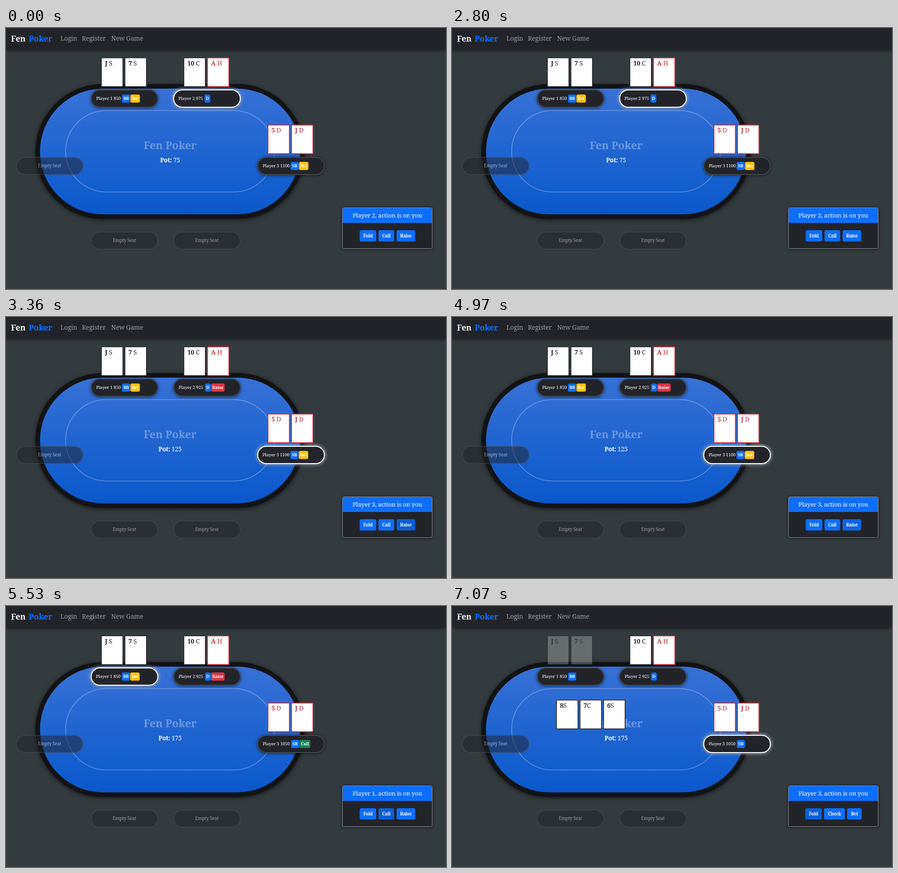
An HTML page that plays this animation: 971 by 577 pixels, repeating every 8000 ms.

```html
<!DOCTYPE html>
<html lang="en">
<head>
<meta charset="utf-8">
<title>Poker table</title>
<style>
html, body { margin: 0; width: 100%; height: 100%; overflow: hidden; background: #343b3e; }
svg { display: block; font: 500 9.8px "Noto Serif", "DejaVu Serif", serif; letter-spacing: -.02em; fill: #fff; }
.b { font-weight: 700; }
.m { text-anchor: middle; }
.nav { font-size: 14px; fill: #9b9c9f; }
.brand { font-size: 18px; font-weight: 600; }
.card { font-size: 14px; font-weight: 400; }
.pill { fill: #222429; stroke: #45494d; stroke-width: 2; }
.shade { filter: drop-shadow(0 1px 3px rgba(0, 0, 0, .6)); }
.glow { fill: #222429; stroke: #fff; stroke-width: 2; filter: drop-shadow(0 0 4px #dfeaff); }
</style>
</head>
<body>
<svg id="stage" width="971" height="577" viewBox="0 0 971 577">
  <defs>
    <linearGradient id="felt" x2="0" y2="1">
      <stop stop-color="#3871d6"/><stop offset="1" stop-color="#0a58cb"/>
    </linearGradient>
  </defs>
  <rect width="971" height="48" fill="#222429" style="filter: drop-shadow(0 2px 3px rgba(0,0,0,.5))"/>
  <text class="brand" x="11" y="30">Fen</text>
  <text class="brand b" x="50" y="30" fill="#0d6efd">Poker</text>
  <g class="nav">
    <text x="120" y="28">Login</text><text x="167.5" y="28">Register</text><text x="232" y="28">New Game</text>
  </g>
  <rect x="65" y="124" width="594" height="298" rx="149" fill="#111315" style="filter: drop-shadow(0 2px 5px rgba(0,0,0,.65))"/>
  <rect x="75" y="134" width="574" height="278" rx="139" fill="url(#felt)"/>
  <rect x="131.5" y="182.5" width="461" height="180" rx="90" fill="none" stroke="#fff" stroke-opacity=".3" stroke-width="1.7"/>
  <text class="m" x="362" y="268" font-size="23.5" font-weight="600" fill-opacity=".32">Fen Poker</text>
  <g id="empty"></g>
  <g id="live"></g>
</svg>
<script>
const LOOP = 8000, BLUE = '#0d6efd', INK = '#212529', RED = '#c5303c';
const $ = id => document.getElementById(id);

// Badge name -> [width, colour]
const BADGES = {
  D: [13, BLUE], BB: [18, BLUE], SB: [18, BLUE],
  Bet: [21, '#ffc107'], Raise: [30, '#dc3545'], Call: [24, '#198754']
};
const SEATS = [[187.5, 136.5], [369.5, 136.5], [555, 285.5]];
const EMPTY = [[22.5, 285.5], [187.5, 450.5], [369.5, 450.5]];
const ACTIONS = [['Fold', 780.5, 36.5], ['Call', 822, 34.5], ['Raise', 862, 41]];
const FLOP_ACTIONS = [['Fold', 779.5, 36.5], ['Check', 821, 46], ['Bet', 872, 32]];

// Each seat: chips, offset of the first badge, badges
const PHASES = [
  { at: 0, fade: 1, active: 1, pot: 75, seats: [[850, 68.5, 'BB', 'Bet'], [975, 69, 'D'], [1100, 73, 'SB', 'Bet']] },
  { at: 3080, fade: 290, active: 2, pot: 125, seats: [[850, 68.5, 'BB', 'Bet'], [925, 69.5, 'D', 'Raise'], [1100, 73, 'SB', 'Bet']] },
  { at: 5250, fade: 290, active: 0, pot: 175, seats: [[850, 68.5, 'BB', 'Bet'], [925, 69.5, 'D', 'Raise'], [1050, 74, 'SB', 'Call']] },
  { at: 6930, fade: 150, active: 2, pot: 175, flop: true, seats: [[850, 68.5, 'BB'], [925, 69.5, 'D'], [1050, 74, 'SB']] }
];

const ramp = (t, start, length) => {
  const k = Math.min(1, Math.max(0, (t - start) / length));
  return k * k * (3 - 2 * k);
};
const mix = (a, b, k) => a.map((v, i) => Math.round(v + (b[i] - v) * k));
const box = (x, y, w, h, r, attrs) => `<rect x="${x}" y="${y}" width="${w}" height="${h}" rx="${r}" ${attrs}/>`;
const text = (x, y, s, attrs = '') => `<text x="${x}" y="${y}" ${attrs}>${s}</text>`;
const pill = ([x, y], attrs) => box(x + .5, y + .5, 147, 38, 19, attrs);

function card(x, y, rank, suit, gap = ' ') {
  const red = 'HD'.includes(suit), color = red ? RED : INK;
  return box(x + 1, y + 1, 47.5, 63.5, 1, `fill="#fff" stroke="${color}" stroke-width="${red ? 2 : 1.7}"`) +
    text(x + 8.7, y + 17.5, `<tspan class="b">${rank}</tspan>${gap}${suit}`, `class="card" fill="${color}"`);
}

function seat(i, [chips, offset, ...badges], glow) {
  const [x, y] = SEATS[i], left = x - glow / 2;
  let out = pill(SEATS[i], 'class="pill shade"');
  if (glow) out += pill(SEATS[i], `class="glow" opacity="${glow.toFixed(3)}"`);
  out += text(left + 11.5, y + 22.8, `Player ${i + 1} ${chips}`);
  let bx = left + offset;
  for (const name of badges) {
    const [w, color] = BADGES[name];
    out += box(bx, y + 10.5, w, 18, 3.5, `fill="${color}"`) +
      text(bx + w / 2, y + 22.8, name, 'class="b m" font-size="9.3"');
    bx += w + .5;
  }
  return out;
}

function button([name, x, w], hover) {
  const color = mix([13, 110, 253], [11, 94, 215], hover);
  return box(x, 447, w, 25, 3.5, `fill="rgb(${color})"`) +
    text(x + w / 2, 463, name, 'class="m" font-weight="600"');
}

function panel(phase, hovers) {
  return box(742.5, 397.5, 198, 90, 3, 'class="shade" fill="#222429" stroke="#909398"') +
    `<path d="M743 431V401q0-3 3-3h191q3 0 3 3v30z" fill="${BLUE}"/>` +
    text(841.5, 419, `Player ${phase.active + 1}, action is on you`, 'class="m" font-size="13.4"') +
    (phase.flop ? FLOP_ACTIONS : ACTIONS).map((a, i) => button(a, hovers[i])).join('');
}

function scene(t) {
  const n = PHASES.findLastIndex(p => t >= p.at), phase = PHASES[n], before = PHASES[n - 1];
  const k = before ? ramp(t, phase.at - 20, phase.fade) : 1;
  const glow = i => i === phase.active ? k : before && i === before.active ? 1 - k : 0;
  const hovers = [
    ramp(t, 6640, 150),
    ramp(t, 4970, 140) - ramp(t, 6550, 150),
    ramp(t, 2790, 150) - ramp(t, 4900, 150)
  ];
  return text(362, 297, `<tspan class="b">Pot:</tspan> ${phase.pot}`, 'class="m" font-size="13.5"') +
    phase.seats.map((s, i) => seat(i, s, glow(i))).join('') +
    `<g opacity="${phase.flop ? 1 - .75 * k : 1}">` +
    card(209.5, 65, 'J', 'S') + card(261.5, 65, '7', 'S') + '</g>' +
    card(391.5, 65, '10', 'C') + card(443.5, 65, 'A', 'H') +
    card(577, 213.5, '5', 'D') + card(629, 213.5, 'J', 'D') +
    (phase.flop ? ['8S', '7C', '6S'].map((c, i) => card(229.5 + 52 * i, 207, c[0], c[1], '')).join('') : '') +
    panel(phase, hovers);
}

$('empty').innerHTML = EMPTY.map(p => '<g opacity=".5">' + pill(p, 'class="pill"') +
  text(p[0] + 73.7, p[1] + 22.8, 'Empty Seat', 'class="m" font-size="10"') + '</g>').join('');

let shown = '', start = performance.now();
function draw() {
  const next = scene((performance.now() - start) % LOOP);
  if (next !== shown) $('live').innerHTML = shown = next;
  requestAnimationFrame(draw);
}
draw();
</script>
</body>
</html>
```
